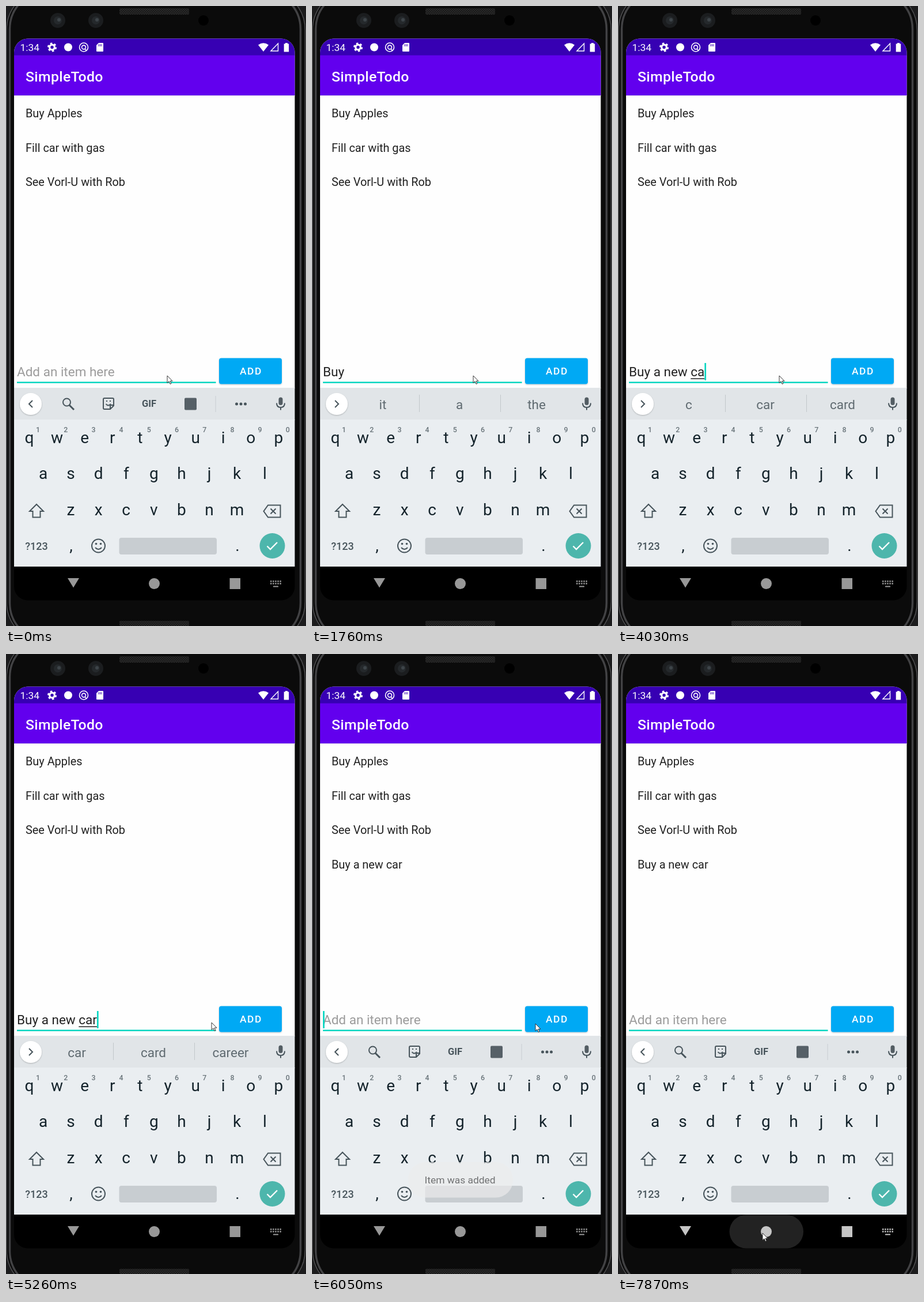
An HTML page that plays this animation: 521x1075 px, repeating every 8000 ms.

```html
<!DOCTYPE html>
<html lang="en">
<head>
<meta charset="utf-8">
<title>Todo app</title>
<style>
html, body { margin: 0; width: 100%; height: 100%; overflow: hidden; background: #0b0b0b; }
svg { display: block; width: 100vw; height: 100vh; }
text { font-family: Roboto, Arial, sans-serif; white-space: pre; }
.line { fill: none; stroke: #47545b; stroke-width: 2; }
</style>
</head>
<body>
<svg viewBox="0 0 521 1075">
  <defs>
    <clipPath id="screen"><rect x="14" y="56.500" width="487.500" height="974" rx="24"/></clipPath>
    <clipPath id="button"><rect x="370" y="610.500" width="109" height="45" rx="4"/></clipPath>
    <pattern id="mesh" width="4" height="4" patternUnits="userSpaceOnUse">
      <rect width="4" height="4" fill="#292929"/><path d="M0 0L4 4M4 0L0 4" stroke="#191919"/>
    </pattern>
    <filter id="soft" x="-20%" y="-20%" width="140%" height="160%">
      <feDropShadow dx="0" dy="1" stdDeviation="1" flood-opacity=".25"/>
    </filter>
  </defs>

  <!-- phone body -->
  <rect width="521" height="1075" fill="#1c1c1d"/>
  <rect x="1" y="-30" width="518.500" height="1135" rx="72" fill="#0b0b0b" stroke="#505052" stroke-width="1.500"/>
  <rect x="6.500" y="-26" width="505" height="1127" rx="66" fill="#0b0b0b" stroke="#424244" stroke-width="3.500"/>
  <rect x="197" y="4" width="121" height="11" rx="2" fill="url(#mesh)"/>
  <rect x="197" y="1066" width="121" height="11" rx="2" fill="url(#mesh)"/>
  <g fill="#1b1d1f">
    <circle cx="90" cy="25" r="13"/><circle cx="156" cy="25" r="13"/>
    <g fill="#25292c"><circle cx="90" cy="25" r="7"/><circle cx="156" cy="25" r="7"/></g>
    <g fill="#3d4449"><circle cx="92" cy="24" r="3"/><circle cx="158" cy="24" r="3"/></g>
  </g>
  <circle cx="343" cy="25" r="9" fill="#000"/>

  <!-- app -->
  <g clip-path="url(#screen)">
    <rect x="14" y="56" width="488" height="607" fill="#fefefe"/>
    <rect x="14" y="56" width="488" height="30" fill="#3700b3"/>
    <rect x="14" y="85.500" width="488" height="69.500" fill="#6200ee"/>
    <rect x="14" y="155" width="488" height="1" fill="#e4e0ea"/>
    <rect x="14" y="662" width="488" height="56" fill="#e1e5e8"/>
    <rect x="14" y="717" width="488" height="255" fill="#eaeef1"/>
    <rect x="14" y="972" width="488" height="60" fill="#000"/>
  </g>

  <!-- status icons -->
  <g fill="none" stroke="#fff">
    <circle cx="80" cy="71.500" r="4.300" stroke-width="3.200"/>
    <circle cx="80" cy="71.500" r="6.800" stroke-width="2.400" stroke-dasharray="3.600 3.520"/>
    <circle cx="135" cy="71.500" r="7.500" stroke-width="1.600"/>
    <circle cx="135" cy="71.500" r="3.400" stroke-width="1.600"/>
    <path d="M137 74l3 4" stroke-width="1.600"/>
    <path d="M460 78L472.500 65V78Z" stroke-width="1.400"/>
  </g>
  <g fill="#fff">
    <circle cx="108" cy="71.500" r="7"/>
    <path d="M161 64h7q1 0 1 1v13q0 1-1 1h-10q-1 0-1-1v-10z"/>
    <path d="M438 67.500q9-6.500 18 0L447 79z"/>
    <path d="M485 64h4v1.500h2.200V79.500h-8.500V65.500H485z"/>
  </g>
  <path d="M161 66v4M163.500 66v4M166 66v4" stroke="#3700b3"/>

  <!-- input row -->
  <rect x="19" y="651.500" width="345.500" height="2.500" fill="#03d6c1"/>
  <rect x="370" y="610.500" width="109" height="45" rx="4" fill="#03a9f4" filter="url(#soft)"/>
  <circle id="press" cx="390" cy="643" fill="#fff" clip-path="url(#button)"/>

  <!-- keyboard strip -->
  <circle cx="43" cy="690" r="19" fill="#fff" filter="url(#soft)"/>
  <path id="chevron" class="line"/>
  <g fill="#535d63">
    <rect x="473.500" y="678.500" width="7" height="13.500" rx="3.500"/>
    <path d="M470 688.500q0 7.500 7 7.500t7-7.500M477 696v4.500" class="line"/>
  </g>
  <g id="tools">
    <circle cx="105.500" cy="687" r="6.500" class="line"/>
    <path d="M110 692l8 8" class="line" style="stroke-width:3"/>
    <path d="M169 682q0-2 2-2h14q2 0 2 2v11l-6 6h-10q-2 0-2-2zM187 692h-4q-2 0-2 2v5" class="line"/>
    <path d="M173.500 690q4 5 8.500 0M174 685h2M180 685h2" class="line"/>
    <rect x="310" y="679.500" width="21" height="21" rx="2" fill="#566067"/>
    <path d="M364 676v28" stroke="#c8cdd1"/>
    <g fill="#47545b"><circle cx="400.500" cy="690" r="2.500"/><circle cx="408" cy="690" r="2.500"/><circle cx="415.500" cy="690" r="2.500"/></g>
  </g>
  <path id="splits" d="M186.500 674v30M327.500 674v30" stroke="#c2c7ca"/>

  <!-- keys -->
  <path class="line" d="M53 864L65 876H59.500V886.500H46.500V876H41Z"/>
  <path class="line" d="M455 865.500H476.500V886.500H455L447.500 876Z M459.500 871.500l9 9m0-9l-9 9"/>
  <circle cx="160.500" cy="936" r="11.500" class="line"/>
  <path d="M155 939q5.500 6 11 0" class="line"/>
  <circle cx="156.500" cy="932.500" r="1.800" fill="#47545b"/><circle cx="164.500" cy="932.500" r="1.800" fill="#47545b"/>
  <rect x="196.500" y="922" width="169.500" height="29" rx="4" fill="#c8cdd1"/>
  <circle cx="462.500" cy="936" r="22" fill="#4db6ac"/>
  <path d="M453.500 936.500l5.500 5.500 12-12" fill="none" stroke="#fff" stroke-width="2.400"/>

  <!-- system bar -->
  <rect id="ripple" x="193.500" y="972.500" width="128.500" height="58" rx="29" fill="#222"/>
  <g id="nav">
    <path d="M107 992h20l-10 16.500z"/><circle cx="257.500" cy="1001.500" r="9.500"/>
    <rect x="388.500" y="992" width="18.500" height="19"/>
    <path d="M459 997.500h19M459 1001.500h19" style="stroke-width:2.500;stroke-dasharray:2.500 1.600"/>
    <path d="M464 1006.500h9" style="stroke-width:2"/>
  </g>

  <g id="labels"></g>
  <rect id="under" y="645.500" height="1.500" fill="#222"/>
  <rect id="caret" y="619" width="2.700" height="30" fill="#03d6c1"/>
  <g id="toast">
    <rect x="167" y="881" width="182" height="61.500" rx="30" fill="#ededed"/>
    <text x="195.500" y="918" font-size="17.400" fill="#303030">Item was added</text>
  </g>
  <path id="mouse" d="M0 0V12.500L3 9.800L5 14.500L7 13.600L5 9.200H9Z" fill="#fff" stroke="#222" stroke-width=".9"/>
</svg>

<script>
const $ = id => document.getElementById(id);
const SVG = 'http://www.w3.org/2000/svg';

function label(x, y, size, text, fill, attrs = {}) {
  const el = document.createElementNS(SVG, 'text');
  const all = { x, y, 'font-size': size, fill, ...attrs };
  for (const key in all) el.setAttribute(key, all[key]);
  el.textContent = text;
  return $('labels').appendChild(el);
}
const mid = { 'text-anchor': 'middle' };
const medium = { 'font-weight': 500 };

label(24.5, 78, 17.4, '1:34', '#fff');
label(34, 131, 24.8, 'SimpleTodo', '#fff', { ...medium, 'letter-spacing': .35 });
const items = ['Buy Apples', 'Fill car with gas', 'See Vorl-U with Rob', 'Buy a new car']
  .map((text, i) => label(34, 193 + i * 59.6, 19.86, text, '#212121'));
label(406, 639, 17.4, 'ADD', '#fff', { ...medium, 'letter-spacing': 1.55 });
const hint = label(19, 642, 22.5, 'Add an item here', '#9b9b9b');
const entry = label(19, 642, 22.5, '', '#222');
const gif = label(248.5, 695, 16.5, 'GIF', '#47545b', { ...mid, 'font-weight': 700 });
const tipLabels = [123, 256, 390].map(x => label(x, 698.5, 22.5, '', '#5f6a70', mid));

// Each row: keys, centre of the first key, baseline
for (const [keys, x, y] of [['qwertyuiop', 40.5, 757.5], ['asdfghjkl', 64.5, 820], ['zxcvbnm', 112.5, 883]])
  [...keys].forEach((key, i) => label(x + i * 48.1, y, 28, key, '#14232b', mid));
[...'1234567890'].forEach((n, i) => label(55.5 + i * 48.2, 738.5, 12.4, n, '#69747a', { ...mid, ...medium }));
label(53, 942.5, 18, '?123', '#47545b', { ...mid, ...medium });
label(113, 945, 28, ',', '#14232b', mid);
label(402, 945, 28, '.', '#14232b', mid);

// Changes of state over time: text is committed, word is still being composed
const steps = [
  [0, { text: '', word: '', tips: '', caret: 0, mouse: [280, 641], press: 0, added: 0, toast: 0, home: 0 }],
  [250, { word: 'B', caret: 1 }],
  [380, { tips: 'B But By' }],
  [510, { word: 'Bu', tips: 'Bu But Buy' }],
  [650, { word: 'Buy', tips: 'Buy Buyer Buying' }],
  [1080, { text: 'Buy ', word: '' }],
  [1200, { tips: 'it a the' }],
  [1760, { caret: 0 }],
  [2070, { word: 'a', tips: 'a and amazing', caret: 1 }],
  [2530, { caret: 0 }],
  [3000, { text: 'Buy a ', word: '', tips: 'new few lot', caret: 1 }],
  [3400, { word: 'n', tips: 'n new nice' }],
  [3530, { word: 'ne', tips: 'ne new need' }],
  [3670, { word: 'new', tips: 'new news newer' }],
  [3790, { text: 'Buy a new ', word: '', tips: 'one car home' }],
  [3910, { word: 'c', tips: 'c car card' }],
  [4030, { word: 'ca' }],
  [4160, { word: 'car', tips: 'car card career' }],
  [4740, { caret: 0 }],
  [4990, { mouse: [300, 635] }],
  [5110, { mouse: [325, 638] }],
  [5260, { caret: 1, mouse: [357, 639] }],
  [5410, { mouse: [388, 641] }],
  [5660, { press: 1 }],
  [5780, { press: 2, caret: 0 }],
  [5900, { press: 3, text: '', word: '', caret: 1 }],
  [6050, { press: 0, added: 1, tips: '', toast: .65 }],
  [6180, { toast: .95 }],
  [6320, { toast: 1, caret: 0, mouse: [388, 644] }],
  [6470, { mouse: [345, 800] }],
  [6600, { mouse: [271, 961] }],
  [6750, { mouse: [256, 1008] }],
  [6880, { mouse: [251, 1016], caret: 1 }],
  [7030, { mouse: [251, 1004] }],
  [7300, { caret: 0 }],
  [7730, { toast: 0, home: .5 }],
  [7870, { home: 1 }],
];
const ripples = [[0, 0], [35, .2], [105, .24], [120, .12]];

const pen = document.createElement('canvas').getContext('2d');
pen.font = '22.5px Roboto, Arial, sans-serif';
const endOf = text => 19 + pen.measureText(text).width;
const show = (el, on) => el.setAttribute('opacity', Number(on));

function draw(now) {
  const t = now % 8000;
  const s = Object.assign({}, ...steps.filter(([at]) => at <= t).map(([, change]) => change));
  const full = s.text + s.word;
  const start = endOf(s.text), end = endOf(full);

  entry.textContent = full;
  show(hint, !full);
  $('under').setAttribute('x', start);
  $('under').setAttribute('width', end - start);
  $('caret').setAttribute('x', end);
  show($('caret'), s.caret);

  const tips = s.tips.split(' ');
  tipLabels.forEach((el, i) => el.textContent = tips[i] || '');
  for (const el of [$('tools'), gif]) show(el, !s.tips);
  show($('splits'), s.tips !== '');
  $('chevron').setAttribute('d', s.tips ? 'M40 684l6 6-6 6' : 'M46 684l-6 6 6 6');

  const [radius, alpha] = ripples[s.press];
  $('press').setAttribute('r', radius);
  show($('press'), alpha);
  show(items[3], s.added);
  show($('toast'), s.toast);
  show($('ripple'), s.home);
  const tone = s.home ? '#c6c6c6' : '#989898';
  $('nav').setAttribute('fill', tone);
  $('nav').setAttribute('stroke', tone);
  $('nav').setAttribute('stroke-width', 0);
  $('mouse').setAttribute('transform', `translate(${s.mouse})`);
}

const began = performance.now();
function tick() {
  draw(performance.now() - began);
  requestAnimationFrame(tick);
}
tick();
</script>
</body>
</html>
```
